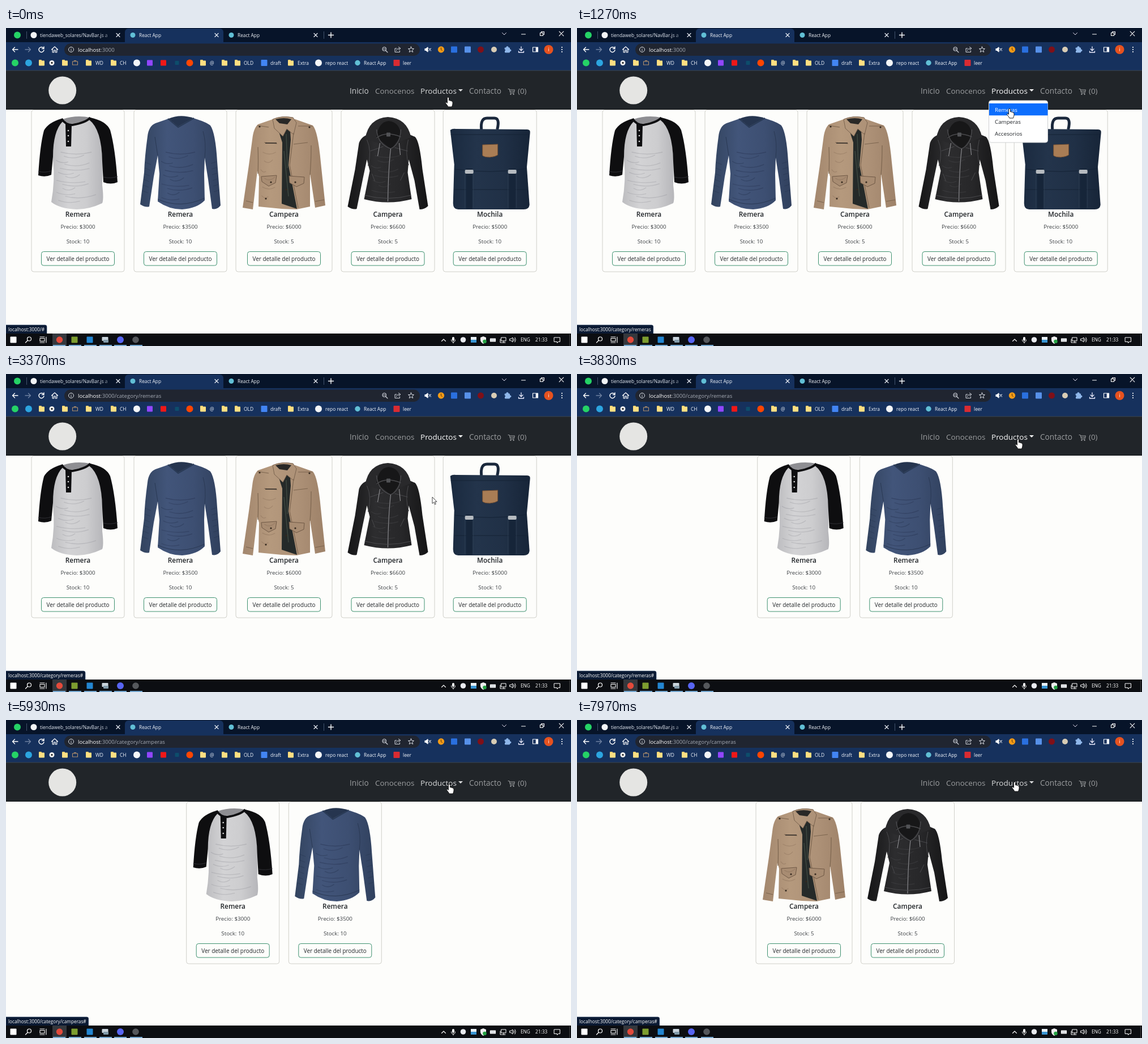
Animation, 998 px wide and 561 px high, one loop 8000 ms. Source, as an HTML page with a canvas:

```html
<!DOCTYPE html>
<html lang="es">
<head>
<meta charset="utf-8">
<title>React App</title>
<style>
html, body { margin: 0; width: 100%; height: 100%; overflow: hidden; background: #fdfdfb; }
canvas { display: block; width: 998px; height: 561px; }
</style>
</head>
<body>
<canvas id="stage"></canvas>
<script>
const W = 998, H = 561, LOOP = 8000;
const canvas = document.getElementById('stage');
const dpr = window.devicePixelRatio || 1;
canvas.width = W * dpr;
canvas.height = H * dpr;
const c = canvas.getContext('2d');

const FONT = '"Open Sans", "Noto Sans", sans-serif';
const BAR = '#16315d', STRIP = '#071429', INK = '#212529', PAGE = '#fdfdfb';

// ---------- drawing helpers ----------
function rect(x, y, w, h, fill, r = 0, stroke, lw = 1) {
  c.beginPath();
  c.roundRect(x, y, w, h, r);
  if (fill) { c.fillStyle = fill; c.fill(); }
  if (stroke) { c.strokeStyle = stroke; c.lineWidth = lw; c.stroke(); }
}
function dot(x, y, r, fill) {
  c.beginPath();
  c.arc(x, y, r, 0, 7);
  c.fillStyle = fill;
  c.fill();
}
function square(x, y, s, fill) { rect(x - s / 2, y - s / 2, s, s, fill, 1); }
// y is the vertical middle of the lowercase letters
function text(s, x, y, size, color, align = 'left', weight = 400) {
  c.font = `${weight} ${size}px ${FONT}`;
  c.textAlign = align;
  c.textBaseline = 'alphabetic';
  c.fillStyle = color;
  c.fillText(s, x, y + size * 0.37);
  return c.measureText(s).width;
}
function shape(d, fill, stroke, lw = 1) {
  const p = new Path2D(d);
  if (fill) { c.fillStyle = fill; c.fill(p); }
  if (stroke) { c.strokeStyle = stroke; c.lineWidth = lw; c.stroke(p); }
}
function icon(x, y, d, color = '#fff', lw = 1.1, fill) {
  c.save();
  c.translate(x, y);
  c.lineCap = c.lineJoin = 'round';
  shape(d, fill, color, lw);
  c.restore();
}
function fade(x0, x1, ...colors) {
  const g = c.createLinearGradient(x0, 0, x1, 0);
  colors.forEach((k, i) => g.addColorStop(i / (colors.length - 1), k));
  return g;
}
// soft cloth creases sweeping across a torso
function creases(x, y, w, h, n, color) {
  for (let i = 0; i < n; i++) {
    const yy = y + h * i / n, k = Math.sin(i * 2.4);
    const a = x + w * (0.05 + 0.2 * (k + 1) / 2), b = a + w * (0.45 + 0.2 * Math.cos(i * 1.7));
    shape(`M${a} ${yy}Q${(a + b) / 2} ${yy + 7} ${b} ${yy - 3 * k}`, null, color, 1.3);
  }
}

// ---------- garments, drawn around x = 0 ----------
function raglan() {
  shape('M-30 5L-10 9L20 3L38 20L44 76L43 120Q46 145 43 152Q20 163 -2 163Q-32 162 -47 150Q-40 110 -44 78L-45 30Z',
    fade(-48, 46, '#bcbcbf', '#d3d3d5', '#cdcdcf', '#b5b5b9'));
  creases(-43, 62, 84, 92, 13, 'rgba(110,110,118,.22)');
  const black = '#0e0e10';
  shape('M-29 3Q-53 10 -60 24Q-67 50 -70 103Q-58 107 -47 102L-44 70Q-44 25 -27 8Z', black);
  shape('M22 1Q50 7 57 23Q66 55 70 115Q58 120 45 115L43 78Q42 22 20 5Z', black);
  shape('M-70 96Q-58 99 -47 95M45 106Q58 109 70 105', null, '#303036');
  shape('M-27 4Q-4 -4 22 1Q8 11 -17 12Z', '#8e8e92');
  shape('M-29 3Q-22 14 -10 14Q14 10 22 1', null, black, 4);
  shape('M-22 12L-11 14L-12 52L-21 52Z', black);
  for (const y of [24, 33, 43]) dot(-17, y, 1.3, '#ddd');
}
function vneck() {
  const blue = fade(-70, 70, '#33445f', '#42557a', '#3d4f72', '#31415e');
  shape('M-21 3L-44 11Q-56 16 -58 34Q-63 70 -64 98L-71 154Q-62 160 -55 158L-47 105L-40 68L-37 100L-40 149Q-20 163 3 163Q30 161 43 147L42 100L43 72L49 110L56 162Q65 164 71 156L65 78Q62 28 53 15Q46 9 23 2L-3 17Z', blue);
  shape('M-21 3Q0 -6 23 2L-4 17Z', '#26354f');
  shape('M-22 3L-4 18L24 2', null, '#293a56', 2.2);
  shape('M-40 68L-45 35M43 72Q46 45 40 25M-40 145Q0 163 43 143', null, '#2a3954');
  creases(-38, 62, 80, 88, 11, 'rgba(28,40,65,.32)');
  for (let i = 0; i < 6; i++)
    shape(`M${-62 - i} ${80 + i * 10}l10 4M${54 + i} ${82 + i * 10}l9 -3`, null, 'rgba(28,40,65,.3)');
}
function coat() {
  const tan = fade(-74, 74, '#a2866d', '#b5997d', '#ad9177', '#9d8168');
  shape('M-20 4L-46 13Q-54 20 -56 40L-62 85L-73 160L-55 163L-47 95L-44 105L-45 158L-4 162L22 163L46 158L46 100L55 160L73 156L65 80Q60 25 51 15L20 4Z', tan);
  shape('M-16 4L10 8L12 40L8 85L23 162L-4 153L-3 45Z', '#252a29');
  shape('M4 30L6 90M0 60L8 140', null, '#3e4840', 1.5);
  shape('M-20 4Q-4 -3 16 1L22 10L17 31L5 21L-2 34L-17 20Z', tan, '#7a634f', 1);
  shape('M-15 4Q0 0 13 4L6 13L-8 11Z', '#292826');
  shape('M-47 15L-27 18M25 16L50 16M-35 45L-12 47M17 48L42 45M-46 53Q-45 78 -46 100M48 50Q48 80 46 102M-67 148L-55 151M55 149L71 146M17 28L10 85L25 160', null, '#7c654f', 1.2);
  shape('M-33 46L-13 46', null, '#36302b', 1.6);
  shape('M-40 105L-13 103L-15 116L-27 122L-39 114ZM9 104L36 106L35 117L22 123L10 116Z', '#a88c72', '#6f5845', 1);
  for (const [x, y] of [[-23, 115], [20, 115], [-32, 144], [-43, 17], [45, 18], [4, 128]]) dot(x, y, 1.6, '#35291f');
  creases(-43, 62, 36, 92, 6, 'rgba(95,72,55,.2)');
}
function hoodie() {
  const dark = fade(-70, 72, '#161617', '#2d2d2f', '#272729', '#141415');
  shape('M-30 30Q-46 32 -51 46L-58 93L-71 158Q-62 164 -55 162L-44 108L-37 75L-32 95L-42 145Q0 156 42 145L35 98L37 75L47 112L56 163Q65 163 71 157L61 92Q56 42 48 35L31 28Z', dark);
  shape('M-40 38Q-34 2 0 0Q34 2 41 36L22 43L6 60L-15 47Z', '#29292b');
  shape('M-20 36Q-17 9 1 7Q22 9 23 34L6 57Z', '#171718');
  shape('M-20 37Q-4 24 23 35', null, '#4a4a4d', 1.4);
  square(1, 31, 7, '#515255');
  shape('M-20 22Q-18 48 5 56Q22 48 23 22', null, '#4a4a4d', 1.5);
  shape('M5 56Q1 90 0 149', null, '#89898d', 1.2);
  shape('M-37 40Q-28 60 -35 86M36 40Q30 65 37 85M-31 60L-8 52M12 54L35 60M-28 100L-23 113M29 98L22 112M-41 138Q0 149 41 138', null, '#4a4a4d', 1);
  shape('M-14 46L-18 69M20 46L22 67', null, '#9a9a9d', 1);
  creases(-33, 68, 68, 70, 8, 'rgba(95,95,100,.25)');
}
function backpack() {
  shape('M-15 22Q-17 2 -5 2L8 2Q18 2 13 22', null, '#1a283c', 5);
  const navy = fade(-70, 71, '#1a2a3f', '#23344b', '#203046', '#172538');
  shape('M-63 85L65 85L70 155Q69 163 60 163L-56 163Q-65 163 -65 152Z', navy);
  shape('M-70 23Q-66 20 -60 21L64 22Q72 21 71 28L65 91Q0 101 -62 92Z', navy);
  shape('M-69 31L70 31M-62 92Q0 101 65 91M-63 128L66 128', null, '#142235');
  for (const x of [-42, 34]) {
    rect(x, 91, 11, 71, '#162539');
    shape(`M${x - 2} 92V160M${x + 13} 92V160`, null, '#324257', .7);
    rect(x - 2, 93, 15, 7, '#b6bbc0', 2);
  }
  shape('M-13 49L14 48L14 67Q10 70 0 71Q-10 71 -13 68Z', '#a97d55', '#6f4d33', 1);
}

const goods = [
  ['Remera', 3000, 10, 164, raglan], ['Remera', 3500, 10, 164, vneck],
  ['Campera', 6000, 5, 170, coat], ['Campera', 6600, 5, 165, hoodie],
  ['Mochila', 5000, 10, 165, backpack]
];
function card(i, cx) {
  const [name, price, stock, w, draw] = goods[i];
  rect(cx - w / 2, 144.5, w, 285.5, PAGE, 4, '#cbcbc4', .9);
  c.save();
  c.translate(cx, 157);
  draw();
  c.restore();
  text(name, cx, 328.5, 11.9, INK, 'center', 600);
  text(`Precio: $${price}`, cx, 350.2, 9.75, '#3b3f43', 'center');
  text(`Stock: ${stock}`, cx, 376.6, 9.75, '#3b3f43', 'center');
  rect(cx - 64.5, 394.5, 129, 24.5, PAGE, 4, '#3f9270');
  text('Ver detalle del producto', cx, 407.2, 9.95, INK, 'center');
}

// ---------- browser ----------
const CROSS = 'M-3 -3L3 3M3 -3L-3 3';
const CHEVRON = 'M-3.5 -1.5L0 2L3.5 -1.5';
const LENS = 'M2 2L5 5M-4 -1A3.2 3.2 0 1 0 2.4 -1A3.2 3.2 0 1 0 -4 -1';
const SPEAKER = 'M-5 -1.5H-3L0 -4V4L-3 1.5H-5Z';

function folder(x) {
  rect(x - 5, 56, 5, 4, '#f3cf68', 1);
  rect(x - 5, 57.5, 10, 9, '#ffdf82', 1);
}
function browser(url) {
  rect(0, 0, W, 25, STRIP);
  rect(210, 1, 174, 30, BAR, 6);
  rect(0, 25, W, 50, BAR);
  dot(20, 12.5, 6, '#25d366');
  dot(49, 12.5, 5.5, '#f2f4f6');
  text('tiendaweb_solares/NavBar.js a', 60, 12.5, 8.4, '#e4eaf2');
  rect(168, 4, 23, 17, fade(168, 191, 'rgba(7,20,41,0)', STRIP));
  for (const x of [224, 398]) {
    dot(x, 12.5, 4.5, '#61bfd5');
    text('React App', x + 11, 12.5, 8.35, '#f2f5fa');
  }
  for (const x of [198, 372, 547]) icon(x, 12.5, CROSS, '#e8edf5', 1.2);
  rect(36, 6, 1, 13, '#42526c');
  rect(561, 6, 1, 13, '#42526c');
  icon(574, 12.5, 'M-4.5 0H4.5M0 -4.5V4.5', '#fff', 1.4);
  icon(880, 10, CHEVRON, '#dde', 1);
  icon(914, 11, 'M-3.5 0H3.5');
  icon(947, 10, 'M-3.5 -1.5H1.5V3.5H-3.5ZM-1.5 -1.5V-3.5H3.5V1.5H1.5');
  icon(981, 10, 'M-3.8 -3.8L3.8 3.8M3.8 -3.8L-3.8 3.8');

  icon(16, 38, 'M5 0H-4.5M-.5 -4L-4.5 0L-.5 4', '#fff', 1.3);
  icon(39, 38, 'M-5 0H4.5M.5 -4L4.5 0L.5 4', '#6e80a0', 1.3);
  icon(62.5, 38, 'M4 -2A4.5 4.5 0 1 0 4.5 1M4.5 -5V-1.5H1', '#fff', 1.4);
  icon(86, 38, 'M-5.5 0L0 -5L5.5 0M-3.8 -1V5H-1.3V1H1.3V5H3.8V-1', '#fff', 1.2);
  rect(103, 27.5, 628, 21.5, '#202530', 11);
  icon(115, 38, 'M-4.5 0A4.5 4.5 0 1 0 4.5 0A4.5 4.5 0 1 0 -4.5 0M0 -.2V2.4M0 -2.4V-2.2', '#dce0e6', 1);
  const w = text('localhost', 127, 38, 9.6, '#fff');
  text(':3000' + url, 127 + w, 38, 9.6, '#a5abb5');
  icon(669, 38, LENS + 'M-2.5 -1H.9', '#d5d9e0');
  icon(692, 38, 'M-2 -2H-5V4.5H3.5V2M-2.5 2Q-1.5 -2 3 -2M1.5 -4.5L5 -2L1.5 .7', '#d5d9e0', 1);
  icon(715.5, 38, 'M0 -5L1.4 -1.6L5 -1.4L2.2 1L3.2 4.6L0 2.6L-3.2 4.6L-2.2 1L-5 -1.4L-1.4 -1.6Z', '#d5d9e0', 1);
  icon(745, 38, SPEAKER + 'M2 -2L5.5 2M5.5 -2L2 2', '#fff', 1.1, '#fff');
  dot(768.5, 38, 5.7, '#f29a16');
  icon(768.5, 38, 'M0 -3V0L2 2', '#53320a', 1);
  square(791.5, 38, 11, '#2a70df');
  square(815.5, 38, 11, '#5791ea');
  dot(838.5, 38, 5.5, '#801018');
  dot(862, 38, 5, '#d8ccb5');
  icon(885.5, 38, 'M-4 -3H-1.5A1.7 1.7 0 1 1 1.5 -3H4V0A1.7 1.7 0 1 1 4 3V5H-4V2.5A1.6 1.6 0 0 0 -4 -.5Z', '#8fb7ea', 1, '#8fb7ea');
  icon(910, 38, 'M0 -5V2M-3 -1L0 2L3 -1M-4.5 3V5H4.5V3', '#eef', 1.3);
  icon(935, 38, 'M-4.5 -4H4.5V4H-4.5ZM1.3 -4V4H4.5V-4Z', '#f4f6fa', 1.2);
  rect(936.5, 34, 3, 8, '#f4f6fa');
  dot(958.5, 38, 8, '#e6521f');
  text('i', 958.5, 38, 9, '#fff', 'center');
  for (const y of [34, 38, 42]) dot(982, y, 1.1, '#fff');

  [63, 104, 146, 190, 348, 386, 409, 503].forEach(folder);
  dot(16, 61.5, 6, '#25d366');
  dot(40, 61.5, 6, '#2ca5e0');
  dot(81, 61.5, 4.5, '#f0f0f0');
  square(81, 61.5, 3, '#222');
  icon(122, 61.5, 'M-4.5 -2.5H4.5V3.5H-4.5ZM-1.5 -2.5V-4H1.5V-2.5', '#b3916d', 1.1);
  dot(231, 61.5, 6, '#f4f6f8');
  square(254, 61.5, 10, '#9146ff');
  square(278, 61.5, 10, '#f01818');
  square(302, 61.5, 7, '#0d4d6c');
  dot(324.5, 61.5, 6, '#ff4500');
  square(456, 61.5, 11, '#4285f4');
  dot(552, 61.5, 6, '#f4f6f8');
  dot(621, 61.5, 4.7, '#61bfd5');
  square(690, 61.5, 11, '#d92b32');
  const marks = { WD: 158, CH: 201, '@': 360, OLD: 420, draft: 467, Extra: 515, 'repo react': 564, 'React App': 632, leer: 701 };
  for (const m in marks) text(m, marks[m], 61.5, 8.45, '#f1f5fb');
}

// ---------- page ----------
const MENU = ['Remeras', 'Camperas', 'Accesorios'];
function navbar(bright) {
  rect(0, 75, W, 69, INK);
  rect(0, 74.5, W, 1, '#3d4650');
  rect(0, 143, W, 1, '#121518');
  dot(99.7, 110, 24.5, '#e5e5e3');
  const dim = '#9b9d9f', lit = '#cdced0', y = 111.4;
  text('Inicio', 607, y, 13.6, bright.home ? lit : dim);
  text('Conocenos', 652, y, 13.4, dim);
  const color = bright.open ? '#fff' : '#dcddde';
  text('Productos', 732, y, 13.5, color);
  shape('M799 108H807L803 112Z', color);
  text('Contacto', 818, y, 13.6, dim);
  icon(893, 112, 'M-6 -4.5H-4L-2 2.5H4L5.5 -3H-3.5M-2.8 -.3H4.7', dim, 1);
  dot(891.5, 116.8, 1.2, dim);
  dot(896.5, 116.8, 1.2, dim);
  text('(0)', 904, y, 13.4, dim);
}
function dropdown(hover, pressed) {
  rect(727.5, 128, 104, 74, '#fff', 4, '#cfd1d3');
  MENU.forEach((label, i) => {
    const on = i === hover;
    if (on) rect(728, 133 + i * 21.2, 103.5, 21.2, pressed ? '#0d6efd' : '#e9ecef');
    text(label, 738, 144 + i * 21.2, 9.75, on && pressed ? '#fff' : INK);
  });
}
function status(s) {
  c.font = `400 8.25px ${FONT}`;
  const w = c.measureText(s).width;
  rect(0, 524, w + 8, 16, '#0b1a33', [0, 3, 0, 0], '#243a5c', .7);
  text(s, 4, 532, 8.25, '#fff');
}
function taskbar() {
  rect(0, 539, W, 22, '#0c0e12');
  rect(82, 539, 25, 22, '#35383d');
  square(13, 550, 11, '#fff');
  icon(39.5, 550, 'M-1 1L-5 5M-2 -1.5A3.5 3.5 0 1 0 5 -1.5A3.5 3.5 0 1 0 -2 -1.5', '#fff', 1.2);
  icon(65.5, 550, 'M-5.5 -2.5H2.5V2.5H-5.5ZM-5.5 -5H2.5M-5.5 5H2.5M5.5 -5V5', '#fff', 1.1);
  dot(94.5, 550, 5.7, '#e24a3b');
  square(121, 550, 11, '#7d9d2f');
  square(148, 550, 11, '#2386d1');
  rect(169.5, 545, 11, 7, '#c9d4dc', 1);
  rect(172, 550, 9, 5, '#829baa', 1);
  dot(202, 550, 6, '#5865f2');
  dot(229, 550, 5.8, '#55585c');
  for (const x of [82, 110, 137, 164, 190, 218]) rect(x + 1, 559, 22, 2, '#76a9d2');
  icon(773, 551, 'M-3.5 1.5L0 -2L3.5 1.5');
  rect(788, 545, 4, 7, '#fff', 2);
  icon(790, 550, 'M-3.5 0Q-3.5 4 0 4Q3.5 4 3.5 0M0 4V6', '#fff', 1);
  dot(807.5, 550, 4.8, '#e9ebef');
  rect(821, 545, 10, 10, '#e9f1f7');
  rect(821, 550, 10, 5, '#3995d3');
  shape('M843 544L848 546V551Q847 555 843 557Q839 555 838 551V546Z', '#eee');
  dot(845.5, 553, 3.3, '#25a343');
  icon(860, 550, 'M-4.5 -2H4.5V3H-4.5Z', '#fff', 1.2, '#d8dce0');
  icon(878, 550, 'M-3 -4H5V2H-3ZM1 2V5M-2 5H4M-5 -1V5H-3', '#fff', 1);
  icon(895, 550, SPEAKER + 'M2 -2Q3.5 0 2 2M4 -4Q6.7 0 4 4', '#fff', 1);
  text('ENG', 909, 550, 8.3, '#fff');
  text('21:33', 935, 550, 8.3, '#fff');
  icon(973.5, 550, 'M-5 -4H5V3.5H2L0 5.7V3.5H-5Z', '#fff', 1);
  rect(995, 540, .7, 21, '#555');
}

// ---------- pointer: time, x, y of the tip ----------
const TRACK = [
  [0, 781, 122], [620, 781, 122], [1080, 764, 142], [1390, 764, 142], [1800, 753, 217],
  [3430, 753, 217], [3820, 779, 115], [4040, 779, 115], [4430, 754, 161], [4720, 754, 161],
  [5250, 783, 113], [6300, 783, 113], [6700, 773, 109], [8000, 773, 109]
];
function pointerAt(t) {
  const i = TRACK.findIndex((k, n) => n && t < k[0]);
  const a = TRACK[i - 1], b = TRACK[i];
  const u = (t - a[0]) / (b[0] - a[0]), e = u * u * (3 - 2 * u);
  return { x: a[1] + (b[1] - a[1]) * e, y: a[2] + (b[2] - a[2]) * e };
}
function pointer({ x, y }, hand) {
  c.lineJoin = 'round';
  c.save();
  c.translate(x, y);
  if (hand) shape('M-1.5 1Q0 -1 1.4 1V6Q3 4.8 4 6.5Q5.5 5.7 6.2 7.3Q8 6.8 8 9V12Q7.6 14 6.5 17H0Q-2 13.5 -4.5 10.5Q-4.5 8.5 -2.8 9.2L-1.5 10.5Z', '#fff', '#111', .9);
  else shape('M0 0V11.5L2.7 9L4.5 13.2L6.3 12.4L4.5 8.3H8Z', '#fff', '#333', .9);
  c.restore();
}

function frame(t) {
  const open = (t >= 420 && t < 1350) || (t >= 3940 && t < 4670);
  const pressed = (t >= 1210 && t < 1350) || (t >= 4600 && t < 4670);
  const url = t < 1350 ? '/' : t < 4670 ? '/category/remeras' : '/category/camperas';
  const p = pointerAt(t);
  const row = Math.floor((p.y - 133) / 21.2);
  const hover = open && row >= 0 && row < 3 ? row : -1;
  const onLink = hover >= 0 || p.y < 125;

  c.setTransform(dpr, 0, 0, dpr, 0, 0);
  rect(0, 0, W, H, PAGE);
  browser(url === '/' ? '' : url);
  if (t < 3400) [127, 308, 491, 674.5, 854.7].forEach((x, i) => card(i, x));
  else if (t < 6700) { card(0, 400.7); card(1, 581.3); }
  else { card(2, 401); card(3, 584); }
  navbar({ home: t < 420, open: t >= 420 && t < 4670 });
  if (open) dropdown(hover, pressed);
  status('localhost:3000' + (hover >= 0 ? '/category/' + MENU[hover].toLowerCase() : url + '#'));
  taskbar();
  pointer(p, onLink);
}

const start = performance.now();
function tick() {
  frame((performance.now() - start) % LOOP);
  requestAnimationFrame(tick);
}
tick();
</script>
</body>
</html>
```
